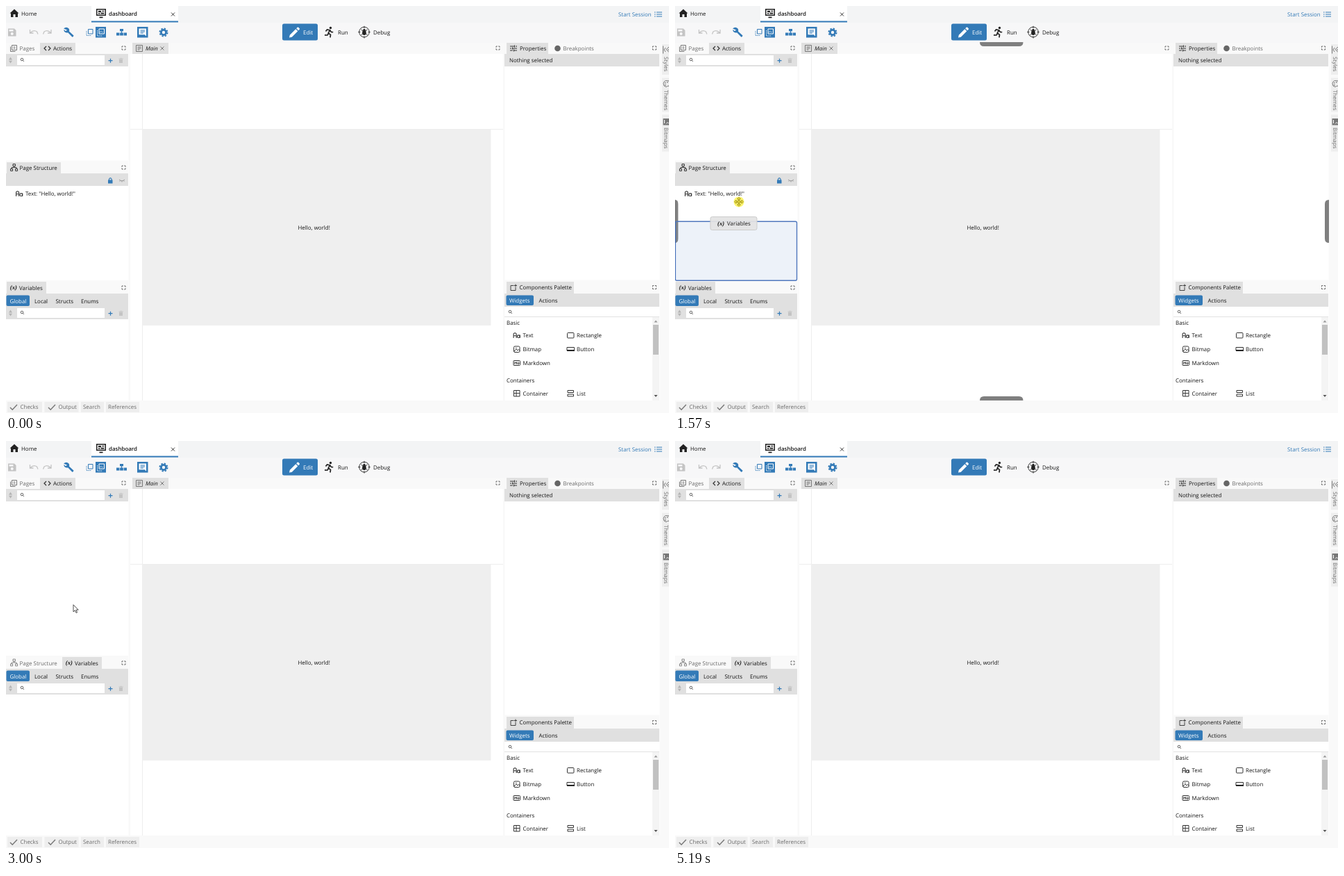
Write an HTML page that moves like this. It is 955 px wide and 586 px high and loops after 5860 ms.

```html
<!DOCTYPE html>
<html lang="en">
<head>
<meta charset="utf-8">
<title>Docking panels</title>
<style>
  html, body { margin: 0; width: 100%; height: 100%; overflow: hidden; background: #fff; }
  svg { display: block; width: 100vw; height: 100vh; }
  text { font: 7.95px "Open Sans", "Noto Sans", sans-serif; fill: #151515; text-rendering: geometricPrecision; white-space: pre; }
  .bold { font-weight: 600; }
  .italic { font-style: italic; }
  .dim { fill: #6a6a6a; }
  .light { fill: #fff; }
  .link, .blue { fill: #337ab7; }
  .fx { font: italic bold 8.7px "Liberation Serif", serif; }
  .bar { fill: #e0e0e0; }
  .strip { fill: #f9f9f9; }
  .chip { fill: #eee; }
  .white { fill: #fff; }
  .line { fill: none; stroke: #333; stroke-width: 1; }
  .line.soft { stroke: #777; }
  .line.off { stroke: #c4c4c4; stroke-width: 1.3; }
  .line.accent { stroke: #337ab7; stroke-width: 1.2; }
  .line.pale { stroke: #fff; }
  .handle { fill: #7f7f7f; }
  #outline { fill: rgba(95, 134, 196, .11); stroke: #4f77bd; stroke-width: 1.4; }
</style>
</head>
<body>
<svg viewBox="0 0 955 586" preserveAspectRatio="none">
  <defs>
    <path id="max" class="line" style="stroke:#555;stroke-width:.9" d="M0 1.7V0H1.7M3.3 0H5V1.7M5 3.3V5H3.3M1.7 5H0V3.3"/>
    <g id="lens" class="line" style="stroke:#555;stroke-width:.9"><circle r="1.8"/><path d="M1.3 1.3L3 3"/></g>
    <path id="check" class="line soft" style="stroke-width:1.4" d="M0 4L3.2 7.2 10 0"/>
    <g id="filter">
      <rect class="bar" width="176" height="18"/>
      <path fill="#b4b4b4" d="M4 8.4L6.5 4.6 9 8.4zM4 9.8L6.5 13.6 9 9.8z"/>
      <rect class="white" x="16" y="2" width="126" height="14"/>
      <use href="#lens" x="23" y="8"/>
      <path class="line accent" d="M147.5 9.7h6M150.5 6.7v6"/>
      <path fill="#c4c4c4" d="M162.5 6.5h2l.5-.8h1.2l.5.8h2v1h-6.2zM163 8h5v5h-5z"/>
    </g>
    <g id="tree" class="line">
      <path d="M4 .6h3.4v3H4zM.6 7.4h3v3h-3zM7.6 7.4h3v3h-3zM5.7 3.6v2M2.1 7.4V5.5h7v1.9"/>
    </g>
    <g id="page" class="line soft"><path d="M.5.5h9v9h-9zM2.5 3h5M2.5 5h5M2.5 7h3"/></g>
    <g id="letters" class="line" style="stroke-width:1.1">
      <path d="M.6 8V3Q.6.8 2.6.8T4.6 3V8M.6 4.8h4"/><circle cx="7.8" cy="5.8" r="1.9"/><path d="M9.7 3.6V8"/>
    </g>
    <g id="varTab">
      <rect class="bar" width="57" height="17"/>
      <text class="fx" x="4.8" y="11.3">(x)</text>
      <text x="18" y="11.5">Variables</text>
    </g>
    <g id="varBody">
      <rect class="white" y="414" width="176" height="154"/>
      <rect class="bar" y="414" width="176" height="20"/>
      <rect class="blue" x=".5" y="416.5" width="33.5" height="15.5" rx="2"/>
      <text class="light" x="5.5" y="427.5">Global</text>
      <text x="41" y="427.5">Local</text>
      <text x="71.5" y="427.5">Structs</text>
      <text x="108" y="427.5">Enums</text>
      <use href="#filter" y="433"/>
      <use href="#max" x="167" y="403"/>
    </g>
  </defs>

  <rect width="955" height="586" fill="#fff"/>

  <!-- title bar -->
  <rect width="955" height="24" fill="#f3f4f5"/>
  <path d="M5.5 10.5L12 4.5l6.5 6H17V16h-3.5v-4h-3v4H7v-5.5z" fill="#222"/>
  <text x="22" y="13.7">Home</text>
  <rect class="white" x="123" width="125" height="22"/>
  <rect class="blue" x="123" y="21.5" width="125" height="2"/>
  <g fill="#222">
    <path d="M130 4h14v10h-14zM134.5 15.5h5v1.7h-5z"/>
    <path class="white" d="M131.5 5.5h11v7h-11z"/>
    <path d="M133 6.7h4v2.2h-4zM138.3 6.7h3v1.2h-3zM133 10h2.3v1.5H133zM136.5 9.6h4.8v2h-4.8z"/>
  </g>
  <text class="bold" x="148" y="13.7">dashboard</text>
  <path class="line" d="M238 9.5l5 5M243 9.5l-5 5"/>
  <text class="link" x="882" y="14.6">Start Session</text>
  <path class="line accent" d="M934 9h1.6M937 9h8M934 12h1.6M937 12h8M934 15h1.6M937 15h8"/>

  <!-- toolbar -->
  <rect y="24" width="955" height="29" fill="#f7f7f8"/>
  <path fill="#c4c4c4" fill-rule="evenodd" d="M3 32.5h9l2.5 2.5v8.5H3zM4.5 34h6v2.5h-6zM8.7 38a2 2 0 1 0 .1 0z"/>
  <path class="line off" d="M34.5 34v5h5M35 38.5q5-5 9.5-1.5l1.5 3.5"/>
  <path class="line off" d="M65 34v5h-5M64.5 38.5q-5-5-9.5-1.5l-1.5 3.5"/>
  <path class="blue" d="M83 32.5q4-3.5 7.5 0 1.3 1.8.5 4l6.5 6q-.2 2-2 2.2l-6.3-6.5q-3.2.8-5-1.2-1.2-1.7-.7-3l2.5 2.3 2-1.8z"/>
  <path class="line accent" style="stroke-width:1" d="M118.5 33.5h6.5v6.5h-6.5z"/>
  <path class="line accent" style="stroke-width:1" stroke-dasharray="1.2 1" d="M116 36v6.5h7"/>
  <rect class="blue" x="129" y="30" width="15" height="15.5"/>
  <path class="line pale" d="M134 33h7.5v7H134z"/><path class="line pale" stroke-dasharray="1.2 1" d="M131.5 35v8h7.5M135 38l2-2 1.5 2 1.5-1"/>
  <path class="blue" d="M164 33h5v3.2h-5zM159 38.5h15v4h-15z"/>
  <path class="line accent" d="M166.5 36v3"/><path class="line pale" style="stroke-width:.7" d="M163.7 38v5M169.3 38v5"/>
  <rect class="blue" x="189" y="30" width="15.5" height="15.5"/>
  <path class="white" d="M191.5 32.5H202v11l-2.2-2.2h-8.3z"/>
  <path class="line accent" d="M193.5 35h6.5M193.5 37h6.5M193.5 39h4.5"/>
  <g fill="none" stroke="#337ab7">
    <circle cx="227" cy="38" r="3.6" stroke-width="2.8"/>
    <circle cx="227" cy="38" r="5.6" stroke-width="1.8" stroke-dasharray="2.4 1.998"/>
  </g>

  <rect class="blue" x="398" y="25.5" width="51" height="24" rx="2.5"/>
  <path class="white" d="M408 45.5l.8-3.8 8.5-8.5 3 3-8.5 8.5zM418.2 32.3l1.5-1.5q.8-.5 1.5 0l1.5 1.5q.6.8 0 1.5l-1.5 1.5z"/>
  <text class="light" x="428" y="40.6">Edit</text>
  <circle cx="467.5" cy="31.5" r="1.7" fill="#222"/>
  <path class="line" style="stroke:#222;stroke-width:1.7" d="M460.5 36.5l2-2.5 4 .8-2.2 4.2 3.2 2.3-.5 4M464.5 39.5l-1.5 2.5-4-.2M467 35.5l1.5 2 2.7.2"/>
  <text x="478" y="40.6">Run</text>
  <circle class="line" cx="516" cy="37.5" r="7.3"/>
  <path class="line" d="M516 28.8v3M516 43.5v3M507.3 37.5h3M521.7 37.5h3M511.5 34l3 2M520.5 34l-3 2M511.5 41.5l3-2M520.5 41.5l-3-2"/>
  <ellipse cx="516" cy="38.3" rx="2.8" ry="3.6" fill="#222"/><circle cx="516" cy="34.3" r="1.6" fill="#222"/>
  <text x="529" y="40.6">Debug</text>

  <!-- tab strips -->
  <path class="strip" d="M0 53h942v16H0zM718 397h223v17H718zM176.5 53h2.5v515h-2.5zM716 53h2.5v515H716z"/>

  <!-- actions -->
  <path class="line soft" d="M8.5 56.5h7v7h-7zM6.5 58.5v7h7M10.5 59h3M10.5 61h3"/>
  <text class="dim" x="19.5" y="63.7">Pages</text>
  <rect class="bar" x="49" y="53" width="51" height="16"/>
  <path class="line" style="stroke-width:1.2" d="M58 58l-3 3 3 3M61 58l3 3-3 3"/>
  <text x="68" y="63.7">Actions</text>
  <use href="#max" x="167" y="58"/>
  <use href="#filter" y="69"/>

  <!-- left column with separate panels -->
  <g id="split">
    <path class="strip" d="M0 222.5h176v18.5H0zM0 395h176v19H0z"/>
    <rect class="bar" x="1" y="225" width="78" height="16"/>
    <rect class="bar" y="241" width="176" height="18"/>
    <use href="#tree" x="6" y="227"/>
    <text x="19.5" y="236">Page Structure</text>
    <use href="#max" x="167" y="230"/>
    <path class="blue" d="M147 250.5h6.5v5H147z"/><path class="line accent" d="M148.5 251v-1.8q1.8-3 3.6 0v1.8"/>
    <path class="line" style="stroke:#999" d="M163 250q4 3.5 8 0M164.5 251.5l-.8 1.2M167 252v1.5M169.5 251.5l.8 1.2"/>
    <use href="#letters" x="14" y="266"/>
    <text x="28" y="273.2">Text: "Hello, world!"</text>
    <use href="#varTab" x="1" y="397"/>
    <use href="#varBody"/>
  </g>

  <!-- left column with tabs merged -->
  <g id="merged">
    <rect class="strip" y="309" width="176" height="19"/>
    <use href="#tree" x="6" y="313.5" opacity=".55"/>
    <text class="dim" x="19.5" y="322.5">Page Structure</text>
    <use href="#varTab" x="81" y="311"/>
    <use href="#varBody" y="-86"/>
  </g>

  <!-- editor -->
  <rect class="bar" x="182" y="53" width="52" height="16"/>
  <use href="#page" x="187" y="56"/>
  <text class="italic" x="201" y="63.7">Main</text>
  <path class="line soft" d="M222.5 58.5l5 5M227.5 58.5l-5 5"/>
  <use href="#max" x="706" y="58"/>
  <path class="line" style="stroke:#eee" d="M196.5 69v499M179 177.5h537"/>
  <rect x="197" y="178" width="501.5" height="282" fill="#efefef"/>
  <text x="420.5" y="321.8">Hello, world!</text>

  <!-- properties -->
  <rect class="bar" x="721" y="53" width="60" height="16"/>
  <path class="line" d="M726 58h6M734 58h2M726 61h2M730 61h6M726 64h4M732 64h4M732.5 56.5v3M729.5 59.5v3M731.5 62.5v3"/>
  <text x="740" y="63.7">Properties</text>
  <circle cx="794.5" cy="61" r="4.3" fill="#666"/>
  <text class="dim" x="802.5" y="63.7">Breakpoints</text>
  <use href="#max" x="931.5" y="58"/>
  <rect class="bar" x="718" y="69" width="223" height="18"/>
  <text x="725" y="81.2">Nothing selected</text>

  <!-- components -->
  <path class="strip" d="M718 394.5h223v3H718z"/>
  <rect class="bar" x="721" y="397" width="97" height="17"/>
  <path class="line" style="stroke-width:.9" d="M731.5 402.5h-4.5v7h7v-4.5M734 400.5v4M732 402.5h4"/>
  <text x="739.5" y="408.3">Components Palette</text>
  <use href="#max" x="931.5" y="402.5"/>
  <rect class="bar" x="718" y="414" width="223" height="19"/>
  <rect class="blue" x="720.5" y="416.5" width="39.5" height="14.5" rx="2"/>
  <text class="light" x="725" y="427">Widgets</text>
  <text x="767.5" y="427">Actions</text>
  <use href="#lens" x="726" y="440"/>
  <path class="line" style="stroke:#e2e2e2" d="M718 447.5h223"/>
  <text x="721" y="459">Basic</text>
  <use href="#letters" x="730.5" y="470"/>
  <text x="744.5" y="477">Text</text>
  <rect class="line" x="808.5" y="470.5" width="9.5" height="7.5" rx="1"/>
  <text x="822" y="477">Rectangle</text>
  <rect class="line" x="731.5" y="490" width="8.5" height="8.5" rx="1.5"/>
  <path class="line" d="M732 497l3-3 2 2 1.5-1.5 2 2M734 492.5h1.5"/>
  <text x="744.5" y="497">Bitmap</text>
  <path class="line" d="M808 491.5h10.5v4.5H808z"/><path d="M808 495h11v2h-11z" fill="#222"/>
  <text x="822" y="497">Button</text>
  <rect class="line" x="731" y="510.5" width="9.5" height="7" rx="1"/>
  <path class="line" d="M733 516v-3.5l1.3 1.5 1.3-1.5v3.5M738 512v3M736.7 514.5l1.3 1.5 1.3-1.5"/>
  <text x="744.5" y="517">Markdown</text>
  <text x="721" y="542">Containers</text>
  <path class="line" d="M731.5 553.5h8.5v8.5h-8.5zM735 553.5v8.5M731.5 557.7h8.5"/>
  <text x="744.5" y="560.7">Container</text>
  <path class="line" d="M809 553.5h8.5v3H809zM809 559h8.5v3H809z"/>
  <text x="822" y="560.7">List</text>
  <rect x="931" y="448" width="10" height="120" fill="#f4f4f4"/>
  <rect x="932" y="459" width="8" height="43" fill="#c1c1c1"/>
  <path d="M933.5 455.5l2.5-3 2.5 3z" fill="#999"/>
  <path d="M933.5 560l2.5 3 2.5-3z" fill="#555"/>

  <!-- side tabs -->
  <rect class="strip" x="941.5" y="53" width="13.5" height="515"/>
  <path class="chip" d="M945 55h10v44h-10zM945 103.5h10v49h-10zM945 156.5h10v53h-10z"/>
  <path class="line soft" d="M946.5 57.5v11M955 59l-4 3.5 4 4M950 60l-2 3 2 3M955 63h-2"/>
  <path class="line soft" d="M955 108q-7-2-8 3.5 0 4.5 4 5 1.5-1.5 4-1.5"/>
  <path fill="#777" d="M949 110h1.5v1.5H949zM952 109h1.5v1.5H952zM949 113h1.5v1.5H949zM946.5 162h8.5v9.5h-8.5z"/>
  <path class="line pale" d="M948.5 164v5M951 169.5l2-2 2 2"/>
  <text class="dim" transform="translate(948.3 73) rotate(90)">Styles</text>
  <text class="dim" transform="translate(948.3 121) rotate(90)">Themes</text>
  <text class="dim" transform="translate(948.3 175) rotate(90)">Bitmaps</text>

  <!-- bottom bar -->
  <rect class="strip" y="568" width="955" height="18"/>
  <path class="chip" d="M2 570h50v15H2zM55.5 570h49v15h-49zM108 570h33v15h-33zM144 570h48v15h-48z"/>
  <use href="#check" x="6" y="574"/><text class="dim" x="20.5" y="580.3">Checks</text>
  <use href="#check" x="61" y="574"/><text class="dim" x="75.5" y="580.3">Output</text>
  <text class="dim" x="111" y="580.3">Search</text>
  <text class="dim" x="147" y="580.3">References</text>

  <!-- drag overlay -->
  <g id="drag">
    <path class="handle" d="M439 52h62.5q0 6-6 6h-50.5q-6 0-6-6zM439 568h62.5q0-6-6-6h-50.5q-6 0-6 6zM0 279q4.5 0 4.5 6v50q0 6-4.5 6zM942 279q-6 0-6 6v50q0 6 6 6z"/>
    <rect id="outline" rx="2"/>
    <g id="tag">
      <rect x=".5" y=".5" width="67" height="19" rx="2.5" fill="#e4e4e4" fill-opacity=".93" stroke="#ccc"/>
      <text class="fx" x="10.5" y="12.6">(x)</text>
      <text x="24.5" y="12.8">Variables</text>
    </g>
  </g>

  <g id="cursor">
    <circle id="press" r="7.5" fill="#ffee00" opacity=".55"/>
    <path id="arrow" d="M0 0V10.2L2.4 8 4 11.7 5.6 11 4 7.4H7.2Z" fill="#fff" stroke="#222" stroke-width=".8"/>
    <path id="move" d="M0-6.5L2.4-4H.8V-.8H4V-2.4L6.5 0 4 2.4V.8H.8V4H2.4L0 6.5-2.4 4H-.8V.8H-4V2.4L-6.5 0-4-2.4V-.8H-.8V-4H-2.4Z" fill="#fff04a" stroke="#857a10" stroke-width=".8"/>
  </g>
</svg>
<script>
  const LOOP = 5860, ENTER = 180, PRESS = 810, DRAG = 1160, DROP = 2800, EXIT = 5190;
  const $ = id => document.getElementById(id);

  // Bursts of movement: first step, last step, number of steps.
  const bursts = [[0, 0, 1], [ENTER, 740, 9], [PRESS, PRESS, 1], [DRAG, 1710, 9], [1780, 2340, 9],
    [DROP, 3000, 3], [3260, 3830, 9], [3900, 4110, 4], [4710, EXIT, 8]];

  // time, x, y
  const pointerKeys = [
    [180, 756, 522], [320, 530, 472], [460, 190, 420], [600, 42, 400], [740, 30, 409], [810, 31, 411],
    [1160, 33, 405], [1300, 58, 350], [1366, 73, 326], [1435, 77, 317], [1572, 92, 282],
    [1710, 104, 256], [1780, 107, 250], [1850, 107, 249.5], [2060, 103, 243], [2270, 97, 235],
    [3260, 97, 236], [3830, 104, 302], [4110, 109, 328],
    [4710, 116, 331], [4850, 270, 385], [5120, 768, 577]];

  // time, x, y, width, height
  const outlineKeys = [
    [1160, 1, 398, 57, 15], [1300, 42, 350, 70, 68], [1435, 13.5, 318.5, 132, 83.5],
    [1504, .5, 310.5, 175, 85], [1572, .5, 310.5, 175, 85], [1710, .5, 250, 175, 85],
    [1850, .5, 225, 175, 85], [1990, .5, 225, 175, 85], [2200, 78, 226.5, 1, 12]];

  function stepTime(t) {
    const [start, end, count] = bursts.findLast(b => b[0] <= t);
    if (count === 1) return start;
    const step = (end - start) / (count - 1);
    return Math.min(end, start + Math.floor((t - start + 10) / step) * step);
  }

  function sample(keys, t) {
    const next = keys.findIndex(k => k[0] > t);
    if (next < 0) return keys.at(-1).slice(1);
    if (next === 0) return keys[0].slice(1);
    const a = keys[next - 1], b = keys[next];
    const p = (t - a[0]) / (b[0] - a[0]);
    return a.slice(1).map((v, i) => v + (b[i + 1] - v) * p);
  }

  const show = (id, on) => $(id).style.display = on ? "" : "none";
  const place = (id, x, y) => $(id).setAttribute("transform", `translate(${x} ${y})`);

  function draw(now) {
    const t = stepTime(now % LOOP);
    const dragging = t >= DRAG && t < DROP;
    show("split", t < DROP);
    show("merged", t >= DROP);
    show("drag", dragging);
    show("cursor", t >= ENTER && t < EXIT);
    show("press", t >= PRESS && t < DROP);
    show("arrow", !dragging);
    show("move", dragging);
    place("cursor", ...sample(pointerKeys, t));
    if (dragging) {
      // The tag trails the pointer by one step.
      const [x, y] = sample(pointerKeys, Math.max(DRAG, t - 69));
      place("tag", x - 34, y + 3.5);
      const box = sample(outlineKeys, t);
      ["x", "y", "width", "height"].forEach((name, i) => $("outline").setAttribute(name, box[i]));
    }
  }

  const begin = performance.now();
  function frame() {
    draw(performance.now() - begin);
    requestAnimationFrame(frame);
  }
  frame();
</script>
</body>
</html>
```
